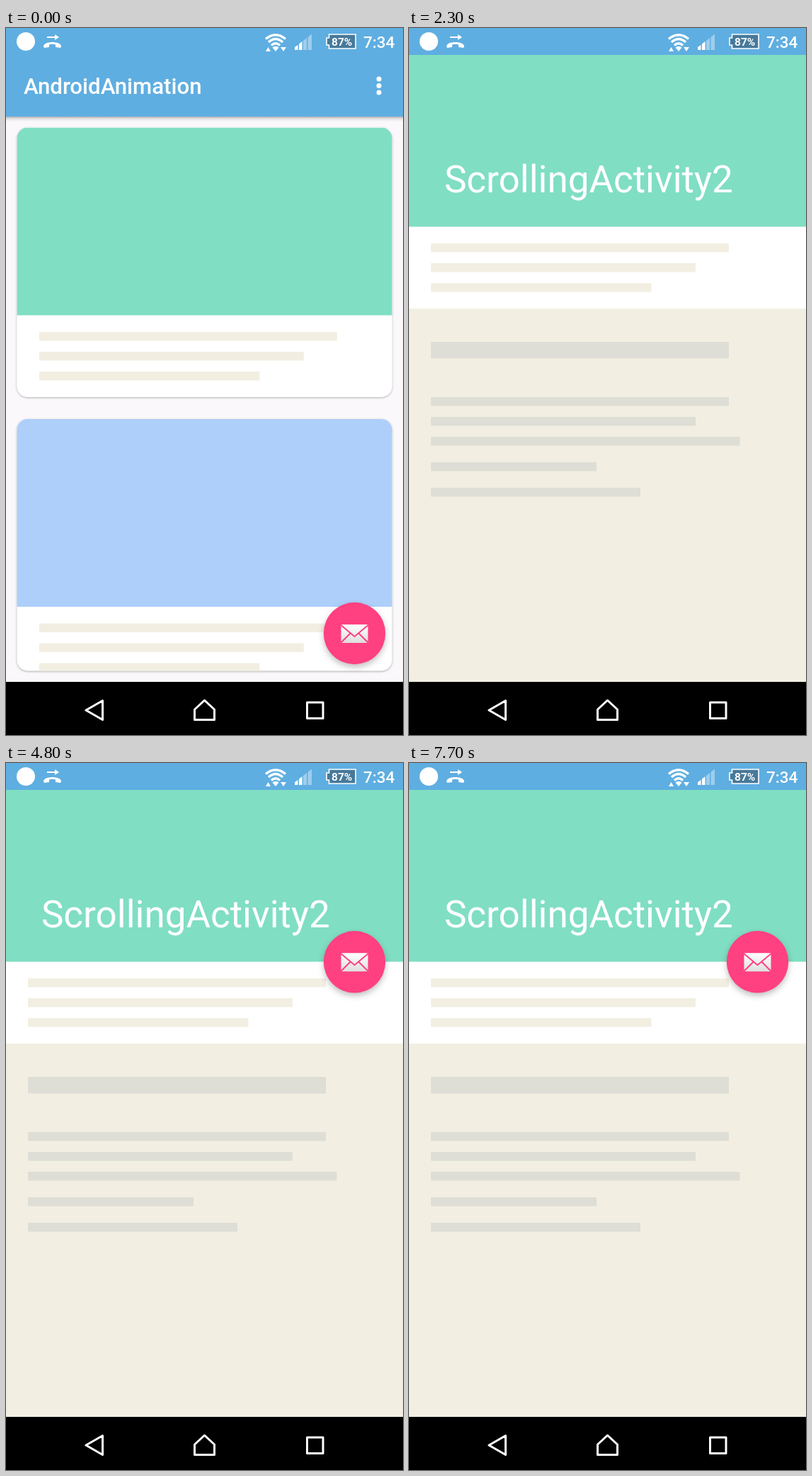
An HTML page for the animation above (8 s loop, 561 by 998 pixels).

```html
<!DOCTYPE html>
<html lang="en">
<head>
<meta charset="utf-8">
<title>Card transition</title>
<style>
html, body { margin: 0; width: 100%; height: 100%; overflow: hidden; background: #000; }
svg { display: block; width: 100%; height: 100%; }
text { font-family: Roboto, sans-serif; fill: #fff; }
.title { font-size: 31.2px; font-weight: 500; }
.blue { fill: #5faee1; }
.cream { fill: #f2efe2; }
.grey { fill: #deded6; }
.lift { filter: drop-shadow(0 1px 1.5px rgba(0, 0, 0, .3)); }
.float { filter: drop-shadow(0 4px 4px rgba(0, 0, 0, .25)); }
</style>
</head>
<body>
<svg viewBox="0 0 561 998">
  <defs>
    <linearGradient id="shade" x2="0" y2="1">
      <stop stop-opacity=".3"/><stop offset=".4" stop-opacity=".1"/><stop offset="1" stop-opacity="0"/>
    </linearGradient>
    <linearGradient id="paper" x2="0" y2="1">
      <stop stop-color="#fff"/><stop offset="1" stop-color="#dedede"/>
    </linearGradient>
    <clipPath id="cardClip"><rect id="cardBox"/></clipPath>
    <clipPath id="lowClip"><rect x="15.5" y="552" width="530" height="355.5" rx="15"/></clipPath>
    <g id="mail">
      <circle r="43.7" fill="#ff4081" class="float"/>
      <rect x="-19" y="-12.5" width="38" height="26" rx="1.5" fill="url(#paper)"/>
      <path d="M-19-11.5 0 4.5 19-11.5M-19 13-6 0M19 13 6 0" fill="none" stroke="#ff4081" stroke-width="2"/>
    </g>
  </defs>

  <g id="home">
    <rect width="561" height="923" fill="#faf8fa"/>
    <rect width="561" height="125" class="blue"/>
    <rect y="125" width="561" height="7" fill="url(#shade)"/>
    <text x="24.9" y="93" class="title">AndroidAnimation</text>
    <g fill="#fff"><circle cx="527" cy="72" r="3.5"/><circle cx="527" cy="81.5" r="3.5"/><circle cx="527" cy="91" r="3.5"/></g>
    <rect x="15.5" y="552" width="530" height="355.5" rx="15" fill="#fff" class="lift"/>
    <g clip-path="url(#lowClip)">
      <rect x="15" y="552" width="531" height="265" fill="#adcffa"/>
      <g id="lowLines" class="cream" transform="translate(46.8 840.5)"></g>
    </g>
    <use href="#mail" x="492.5" y="854.5"/>
  </g>

  <g id="page">
    <rect y="38" width="561" height="885" class="cream"/>
    <g id="body" class="grey"></g>
  </g>

  <rect id="cardShadow" fill="#fff" class="lift"/>
  <g clip-path="url(#cardClip)">
    <rect id="cardBack" width="561" height="998" fill="#fff"/>
    <rect id="head" width="561" fill="#80dec3"/>
    <g id="cardLines" class="cream"></g>
  </g>
  <rect id="scrim" y="38" width="561" class="blue"/>
  <rect id="barShade" y="125" width="561" height="7" fill="url(#shade)"/>
  <text id="heading">ScrollingActivity2</text>
  <use id="fab" href="#mail"/>

  <rect width="561" height="38" class="blue"/>
  <g fill="#fff">
    <circle cx="28" cy="19" r="13"/>
    <path d="M53 26C53 18 78 18 78 26L77 28 70 27V23.5Q65.5 22 61 23.5V27L54 28Z"/>
    <path d="M58 12H69V9L75 13 69 17V14H58Z"/>
    <path d="M381 33 376.500 27.500Q381 24 385.500 27.500ZM367 33 370.500 27 374 33ZM388 27H396L392 33Z"/>
    <g fill="none" stroke="#fff" stroke-width="3.4">
      <path d="M367 15.500Q381 4 395 15.500M371 20Q381 11 391 20M375 24.500Q381 19 387 24.500"/>
    </g>
    <path d="M408 31V27L412.500 24V31ZM414 31V22.500L418.500 19V31Z"/>
    <path d="M420 31V18L425 14V31ZM426.500 31V13L432 8.500V31Z" opacity=".4"/>
    <path d="M456.500 9H494V29H456.500V24H453V14H456.500Z" fill="#47799a" stroke="#fff" stroke-width="1.6"/>
    <text x="460" y="24.500" font-size="15.500" font-weight="700">87%</text>
    <text x="505" y="27.500" font-size="22.500" font-weight="500">7:34</text>
  </g>

  <rect y="923" width="561" height="75"/>
  <path d="M113 963 136.500 949.500V976.500ZM266.500 962 280.500 949 294.500 962V976.500H266.500ZM425.500 952H448V974.500H425.500Z" fill="none" stroke="#fff" stroke-width="3" stroke-linejoin="round"/>
</svg>
<script>
const LOOP = 8000, SCROLL = 156;
const $ = id => document.getElementById(id);
const set = (id, attrs) => { for (const k in attrs) $(id).setAttribute(k, attrs[k]); };
const mix = (a, b, k) => a + (b - a) * k;
const bar = (y, w, h = 12.5, x = 0) => `<rect x="${x}" y="${y}" width="${w}" height="${h}"/>`;

const lines = bar(0, 421) + bar(28, 374) + bar(56, 311.5);
$('lowLines').innerHTML = $('cardLines').innerHTML = lines;
$('body').innerHTML = bar(443, 421, 23.5, 31) +
  [[521, 421], [549, 374], [577, 436.5], [613, 234], [649, 296]].map(([y, w]) => bar(y, w, 12.5, 31)).join('');

// Cubic Bezier easing, solved by bisection.
function bezier(x1, y1, x2, y2) {
  const at = (a, b, u) => 3 * a * u * (1 - u) ** 2 + 3 * b * u * u * (1 - u) + u ** 3;
  return x => {
    if (x <= 0 || x >= 1) return x <= 0 ? 0 : 1;
    let lo = 0, hi = 1;
    for (let i = 0; i < 20; i++) {
      const mid = (lo + hi) / 2;
      if (at(x1, x2, mid) < x) lo = mid; else hi = mid;
    }
    return at(y1, y2, lo);
  };
}
const standard = bezier(.4, 0, .2, 1);
const leave = bezier(.4, 0, 1, 1);
const enter = bezier(0, 0, .2, 1);
const drag = bezier(.35, 0, .5, 1);
const span = (t, from, to, ease = standard) => ease(Math.min(1, Math.max(0, (t - from) / (to - from))));

function render(t) {
  const open = span(t, 1470, 2080) - span(t, 4850, 5480) + span(t, 6570, 7180);
  const shown = span(t, 1450, 1850) - span(t, 4950, 5500) + span(t, 6550, 6950);
  const fold = span(t, 2750, 3150, drag) - span(t, 3650, 4050, drag);
  const scrim = span(t, 2880, 3480, leave) - span(t, 3800, 4400, enter);
  const fab = span(t, 2300, 2580, enter) - span(t, 2880, 3080, leave) + span(t, 3830, 4050, enter)
    - span(t, 4850, 5050, leave) + span(t, 7400, 7680, enter);
  const shift = SCROLL * fold;

  const x = mix(15.5, 0, open), y = mix(140.5, 38, open);
  const edge = mix(405.5, 280.5, open) - shift;
  const box = { x, y, width: 561 - 2 * x, height: edge + 115.5 - y, rx: 15 * (1 - open) };
  set('cardBox', box);
  set('cardShadow', { ...box, opacity: 1 - open });
  set('head', { y, height: edge - y });
  set('cardLines', { transform: `translate(${mix(46.8, 31, open)} ${edge + 23.5})` });

  set('page', { opacity: shown });
  set('body', { transform: `translate(0 ${-shift})` });
  set('scrim', { height: edge - 38, opacity: scrim });
  set('barShade', { opacity: fold > .995 ? 1 : 0 });

  const shrink = 1 - (1 - fold) ** 2;
  set('heading', {
    x: mix(49.9, 31.2, fold), y: mix(231.5, 92, fold),
    'font-size': mix(53, 31.2, shrink),
    'font-weight': fold > .99 ? 500 : 400,
    opacity: Math.max(0, open * 2 - 1) * shown
  });
  set('fab', {
    transform: `translate(492.5 ${edge + .3}) scale(${Math.max(fab, .001)})`,
    opacity: Math.min(1, Math.max(0, fab) * 1.5)
  });
}

const start = performance.now();
function tick() {
  render((performance.now() - start) % LOOP);
  requestAnimationFrame(tick);
}
tick();
</script>
</body>
</html>
```
